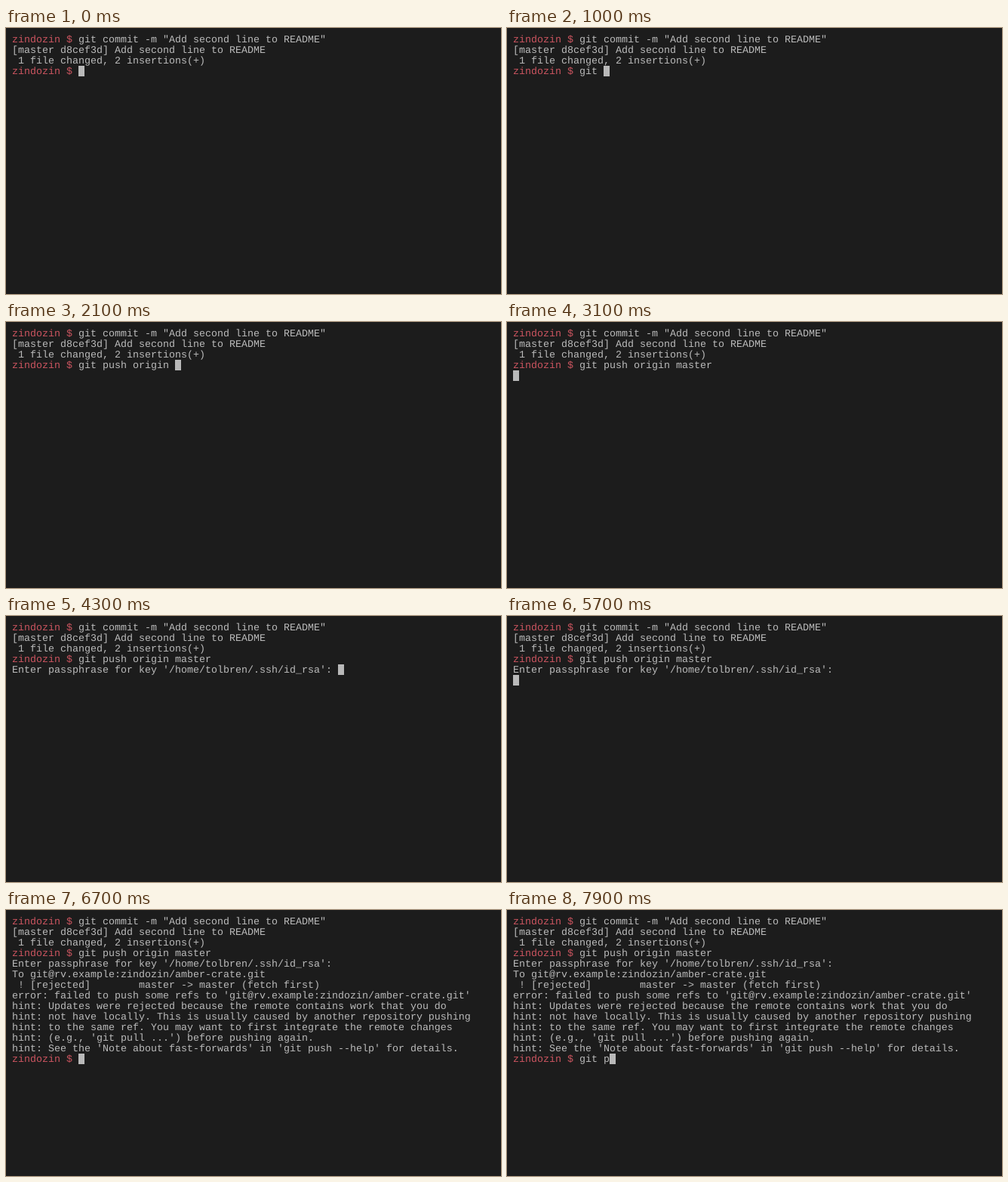
Animation, 656 px wide and 352 px high, one loop 8000 ms. Source, as an HTML page:

```html
<!DOCTYPE html>
<html lang="en">
<head>
<meta charset="utf-8">
<title>Terminal session</title>
<style>
  html, body { margin: 0; width: 100%; height: 100%; overflow: hidden; background: #1c1c1c; }
  svg { display: block; width: 656px; height: 352px; background: #1c1c1c; }
  text {
    font: 13.331px "Liberation Mono", "DejaVu Sans Mono", monospace;
    font-variant-ligatures: none;
    text-rendering: geometricPrecision;
    white-space: pre;
    fill: #bbb;
  }
  .prompt { fill: #cc5560; }
  #cursor { fill: #b9b9b9; }
</style>
</head>
<body>
<svg viewBox="0 0 656 352">
  <g id="rows"></g>
  <rect id="cursor" width="8" height="14"/>
</svg>
<script>
const LOOP = 8000, CELL_W = 8, CELL_H = 14, PAD = 8, BASELINE = 11;
const USER = 'zindozin';
const REMOTE = `git@rv.example:${USER}/amber-crate.git`;
const PROMPT = `${USER} $ `;

const opening = `${PROMPT}git commit -m "Add second line to README"
[master d8cef3d] Add second line to README
 1 file changed, 2 insertions(+)
${PROMPT}`;

const rejection = `To ${REMOTE}
 ! [rejected]        master -> master (fetch first)
error: failed to push some refs to '${REMOTE}'
hint: Updates were rejected because the remote contains work that you do
hint: not have locally. This is usually caused by another repository pushing
hint: to the same ref. You may want to first integrate the remote changes
hint: (e.g., 'git pull ...') before pushing again.
hint: See the 'Note about fast-forwards' in 'git push --help' for details.
${PROMPT}`;

// Each entry appends its text to the screen at the given time in ms.
const output = [
  [0, opening],
  [500, 'g'], [700, 'i'], [800, 't'], [900, ' '],
  [1100, 'p'], [1200, 'us'], [1300, 'h'], [1400, ' '],
  [1600, 'o'], [1700, 'r'], [1800, 'ig'], [1900, 'i'], [2000, 'n'], [2100, ' '],
  [2300, 'm'], [2400, 'a'], [2500, 's'], [2600, 'te'], [2700, 'r'],
  [3100, '\n'],
  [3800, "Enter passphrase for key '/home/tolbren/.ssh/id_rsa': "],
  [5600, '\n'],
  [5900, rejection],
  [7600, 'g'], [7700, 'i'], [7800, 't'], [7900, ' p']
];

const rowGroup = document.getElementById('rows');
const cursor = document.getElementById('cursor');
let shown = '';

function svgNode(name, parent, attrs, content = '') {
  const node = document.createElementNS('http://www.w3.org/2000/svg', name);
  for (const key in attrs) node.setAttribute(key, attrs[key]);
  node.textContent = content;
  return parent.appendChild(node);
}

function drawRow(line, row) {
  const text = svgNode('text', rowGroup, { x: PAD, y: PAD + row * CELL_H + BASELINE });
  const isPrompt = line.startsWith(PROMPT);
  if (isPrompt) svgNode('tspan', text, { class: 'prompt' }, PROMPT);
  svgNode('tspan', text, {}, isPrompt ? line.slice(PROMPT.length) : line);
}

function render(time) {
  const screen = output.filter(([at]) => at <= time).map(([, str]) => str).join('');
  if (screen === shown) return;
  shown = screen;
  const lines = screen.split('\n');
  rowGroup.replaceChildren();
  lines.forEach(drawRow);
  cursor.setAttribute('x', PAD + lines[lines.length - 1].length * CELL_W);
  cursor.setAttribute('y', PAD + (lines.length - 1) * CELL_H);
}

const start = performance.now();
function tick() {
  render((performance.now() - start) % LOOP);
  requestAnimationFrame(tick);
}
tick();
</script>
</body>
</html>
```
